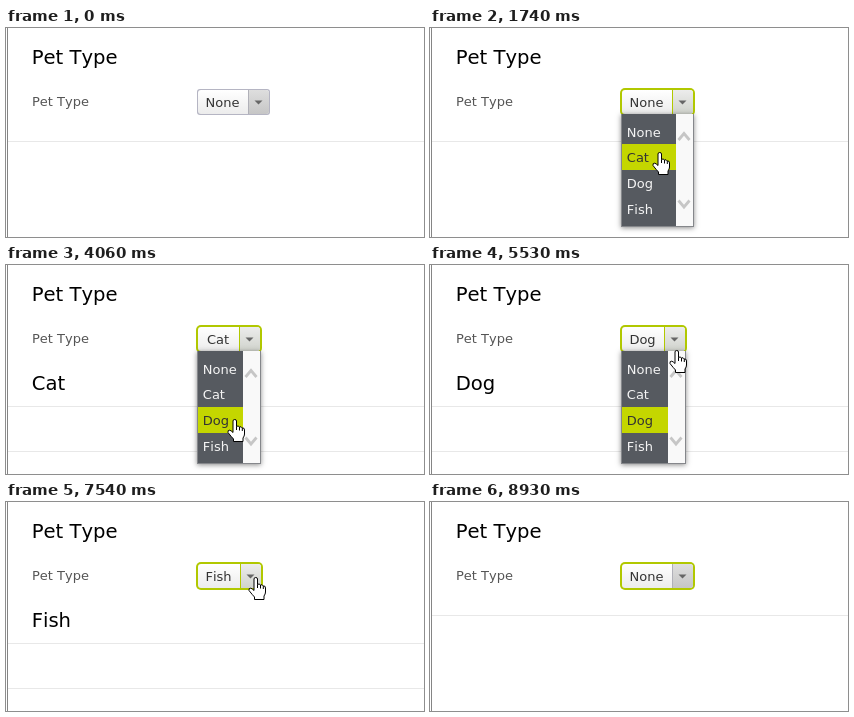
An HTML page with a canvas that plays this animation: 418 px wide and 209 px high, repeating every 9.78 s.

```html
<!DOCTYPE html>
<html lang="en">
<head>
<meta charset="utf-8">
<title>Pet Type</title>
<style>
html, body { margin: 0; width: 100%; height: 100%; overflow: hidden; background: #fff; }
canvas { display: block; width: 418px; height: 209px; }
</style>
</head>
<body>
<canvas id="stage"></canvas>
<script>
const W = 418, H = 209, LOOP = 9780;
const FONT = '"DejaVu Sans", sans-serif';
const GREEN = '#b1c800';
const LEFT = 191, ROW = 26, MENU_TOP = 86, FIRST_ROW = 90;
const STEP = 77; // pointer sampling interval, ms
const canvas = document.getElementById('stage');
const ctx = canvas.getContext('2d');
const ratio = window.devicePixelRatio || 1;
canvas.width = W * ratio;
canvas.height = H * ratio;

const pets = ['None', 'Cat', 'Dog', 'Fish'];

// Each visit: go to the button, open the menu, pick a row
const visits = [
  { start: 590, open: 1280, pick: 1970, grab: [249, 77], item: [230, 124] },
  { start: 2660, open: 3430, pick: 4290, grab: [254, 74], item: [229, 154] },
  { start: 4900, open: 5380, pick: 6300, grab: [247, 84], item: [220, 178] },
  { start: 7000, open: 7690, pick: 8380, grab: [250, 74], item: [220, 105] }
];

const home = [287, 212];
const legs = visits.flatMap(v => [
  { from: v.start, to: v.open - 90, goal: v.grab },
  { from: v.open + 150, to: v.pick - 230, goal: v.item }
]);
legs.push(
  { from: 2140, to: 2360, goal: [279, 150] },
  { from: 8700, to: 8930, goal: [327, 215] }
);
legs.sort((a, b) => a.from - b.from);

const arrowPath = new Path2D('M.5 .5V16.8L4.2 13.3L6.6 18.8L9 17.8L6.6 12.3H11.8Z');
const handPath = new Path2D(
  'M-2 2Q-2 .5 -.3 .5Q1.5 .5 1.5 2V7.5Q3.2 6.2 4.5 8Q6.2 7 7.3 9' +
  'Q9.5 8.5 9.5 11V15Q9.5 17 8 19V22.5H-1.5V20Q-3.5 18 -7 13.5' +
  'Q-7.5 11 -5.3 11.2Q-4 11.4 -2 13.5Z');
const knuckles = new Path2D('M1.5 7.5V11M4.5 8V11.5M7.3 9V12');

const ease = p => p < .5 ? 4 * p ** 3 : 1 - 4 * (1 - p) ** 3;

function pointerAt(t) {
  let [x, y] = home;
  for (const { from, to, goal: [gx, gy] } of legs) {
    if (t < from) break;
    const gaps = Math.round((to - from) / STEP);
    const done = Math.min(gaps, Math.floor((t - from) / (to - from) * gaps)) + 1;
    const p = ease(done / (gaps + 1));
    const sway = gy < y ? 12 * Math.sin(Math.PI * p) : 0;
    x = Math.round(x + (gx - x) * p + sway);
    y = Math.round(y + (gy - y) * p);
  }
  return { x, y };
}

const rowAt = y => Math.min(3, Math.floor((y - FIRST_ROW) / ROW));

function menuAt(t) {
  let chosen = 0, open = false;
  for (const v of visits) {
    if (t >= v.pick) chosen = rowAt(v.item[1]);
    else if (t >= v.open) open = true;
  }
  return { chosen, open, focused: t >= visits[0].open };
}

// Button layout follows the width of its label
function layout(chosen) {
  ctx.font = `13px ${FONT}`;
  const label = ctx.measureText(pets[chosen]).width;
  const split = LEFT + Math.max(42, Math.round(label + 17));
  return { split, right: split + 22 };
}

function text(str, x, y, size, color, align = 'left') {
  ctx.font = `${size}px ${FONT}`;
  ctx.fontKerning = 'none';
  ctx.textAlign = align;
  ctx.fillStyle = color;
  ctx.fillText(str, x, y);
}

function rect(x, y, w, h, color) {
  ctx.fillStyle = color;
  ctx.fillRect(x, y, w, h);
}

function rounded(x, y, w, h, r, color) {
  ctx.beginPath();
  ctx.roundRect(x, y, w, h, r);
  ctx.fillStyle = color;
  ctx.fill();
}

function shade(top, bottom) {
  const g = ctx.createLinearGradient(0, 62, 0, 86);
  g.addColorStop(0, top);
  g.addColorStop(1, bottom);
  return g;
}

function drawPage(chosen) {
  rect(0, 0, W, H, '#fff');
  rect(1, 0, 1, H, '#858585');
  text('Pet Type', 25.7, 36, 19.6, '#000');
  text('Pet Type', 26, 78, 13, '#555');
  if (chosen) text(pets[chosen], 25.7, 125, 19.6, '#000');
  for (const y of chosen ? [141, 186] : [113]) rect(2, y, W - 2, 1, '#e8e8e8');
}

function drawButton(chosen, { split, right }, focused, lively) {
  if (focused) rounded(LEFT - 1, 60, right - LEFT + 2, 28, 5, GREEN);
  else rounded(LEFT, 61, right - LEFT, 26, 3, '#b5b5c3');
  const end = right - 1;
  rounded(LEFT + 1, 62, end - LEFT - 1, 24, 3, shade('#fff', '#ececec'));
  rounded(split, 62, end - split, 24, [0, 3, 3, 0],
    lively ? shade('#ececec', '#d0d3cc') : shade('#dedede', '#c6c6c6'));
  rect(split, 62, 1, 24, lively ? GREEN : '#b0b0b8');
  text(pets[chosen], (LEFT + split) / 2, 79, 13, '#333', 'center');
  const mid = split + 10.5;
  ctx.beginPath();
  ctx.moveTo(mid - 4, 72.5);
  ctx.lineTo(mid + 4, 72.5);
  ctx.lineTo(mid, 76.5);
  ctx.fillStyle = '#666';
  ctx.fill();
}

function chevron(x, y, dir) {
  ctx.beginPath();
  ctx.moveTo(x - 5.5, y + 4 * dir);
  ctx.lineTo(x, y - 2.5 * dir);
  ctx.lineTo(x + 5.5, y + 4 * dir);
  ctx.strokeStyle = '#c6c6c6';
  ctx.lineWidth = 2.8;
  ctx.stroke();
}

function drawMenu(right, active) {
  const bar = right - 18;
  ctx.save();
  ctx.shadowColor = 'rgba(0,0,0,.45)';
  ctx.shadowBlur = 5 * ratio;
  ctx.shadowOffsetY = ratio;
  rect(LEFT, MENU_TOP, right - LEFT, 113, '#85878b');
  ctx.restore();
  rect(LEFT + 1, MENU_TOP, bar - LEFT - 1, 112, '#565a60');
  rect(bar, MENU_TOP, right - 1 - bar, 112, '#f9f9f9');
  pets.forEach((pet, i) => {
    const on = i === active;
    if (on) rect(LEFT + 1, FIRST_ROW + ROW * i, bar - LEFT - 1, ROW, '#c4d600');
    text(pet, 196.8, Math.round(108.6 + 25.7 * i), 13, on ? '#333' : '#f4f4f4');
  });
  chevron(bar + 8, 108, 1);
  chevron(bar + 8, 176.5, -1);
}

function drawPointer({ x, y }, hand) {
  ctx.save();
  ctx.translate(x, y);
  ctx.fillStyle = '#fff';
  ctx.strokeStyle = '#000';
  ctx.lineWidth = 1;
  ctx.lineJoin = 'round';
  const shape = hand ? handPath : arrowPath;
  ctx.fill(shape);
  ctx.stroke(shape);
  if (hand) ctx.stroke(knuckles);
  ctx.restore();
}

function draw(t) {
  ctx.setTransform(ratio, 0, 0, ratio, 0, 0);
  const { chosen, open, focused } = menuAt(t);
  const box = layout(chosen);
  const at = pointerAt(t);
  const hover = at.x > 190 && at.x <= box.right && at.y > 60 && at.y < 88;
  drawPage(chosen);
  drawButton(chosen, box, focused, hover || open);
  if (open) drawMenu(box.right, at.y > FIRST_ROW ? rowAt(at.y) : chosen);
  drawPointer(at, hover || open);
}

const began = performance.now();
function tick() {
  draw((performance.now() - began) % LOOP);
  requestAnimationFrame(tick);
}
tick();
</script>
</body>
</html>
```
